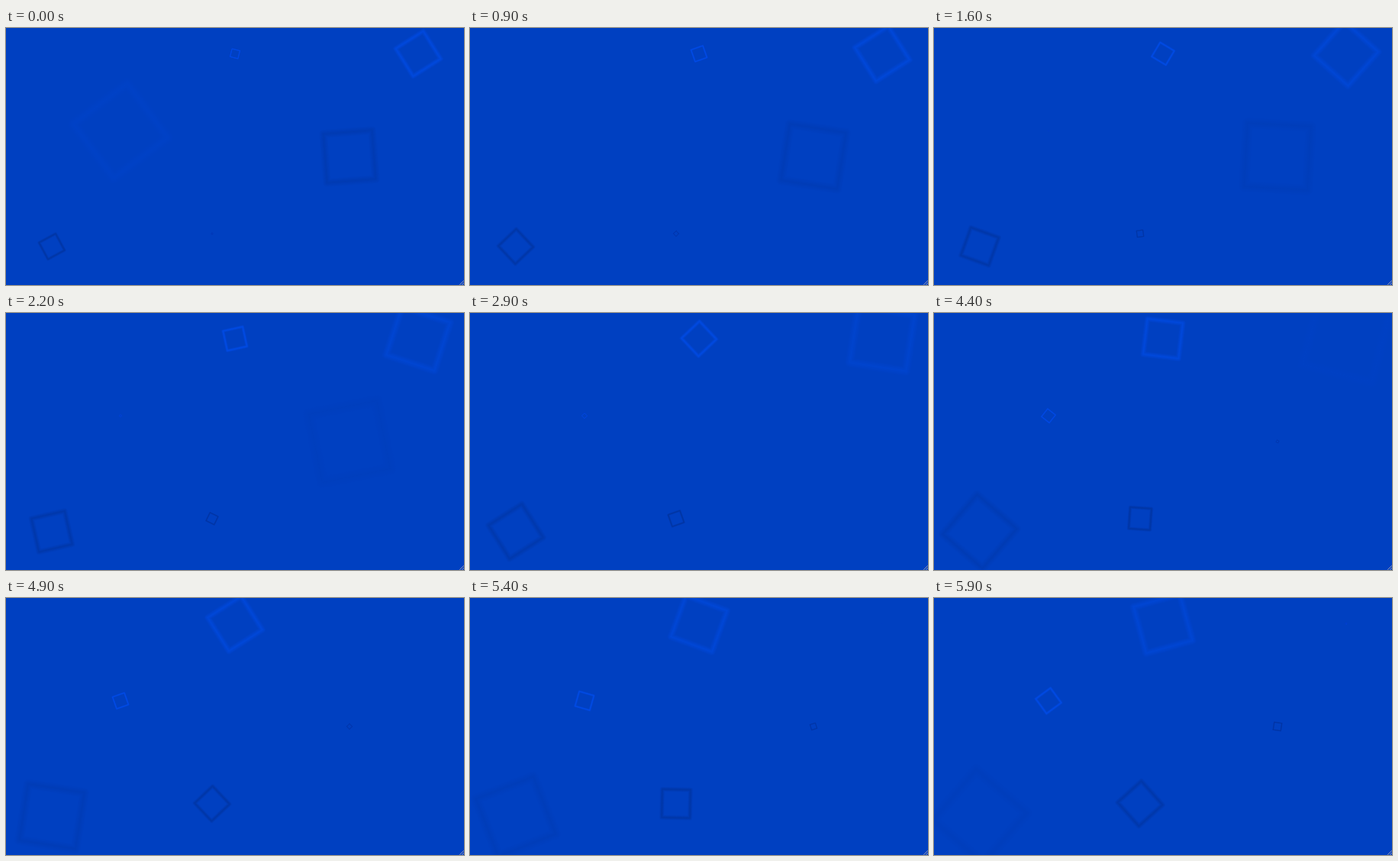
An HTML page that plays this animation: 600 by 336 pixels, repeating every 6000 ms.

```html
<!DOCTYPE html>
<html lang="en">
<head>
<meta charset="utf-8">
<title>Floating squares</title>
<style>
html, body { margin: 0; width: 100%; height: 100%; overflow: hidden; background: #0040c1; }
svg { display: block; width: 600px; height: 336px; }
</style>
</head>
<body>
<svg id="stage" viewBox="0 0 600 336">
  <rect width="600" height="336" fill="#0040c1"/>
  <g id="cubes" fill="none" stroke-linejoin="round"></g>
  <path d="M594.2 335.8L599.8 330.2M597.2 335.8L599.8 333.2" stroke="#8f9bb5" stroke-width="1"/>
</svg>
<script>
const NS = 'http://www.w3.org/2000/svg';
const LOOP = 6000, STEP = 100;
const LIFE = 12, GAP = 2, FIRST_AGE = 1.26;
const UNIT = 107 / 12;   // final length of one border width
const TURN = 960;
const LAYERS = 5;        // stacked strokes give the border its soft edge
const DARK = '#003298', LIGHT = '#0051f4';
const centers = [[270, 268.8], [150, 134.4], [450, 168], [540, 33.6], [60, 285.6], [300, 33.6]];

function add(parent, tag, attrs) {
  const el = document.createElementNS(NS, tag);
  for (const key in attrs) el.setAttribute(key, attrs[key]);
  return parent.appendChild(el);
}

const root = document.getElementById('cubes');
const cubes = centers.map(([x, y], i) => {
  const el = add(root, 'g', { stroke: i % 2 ? LIGHT : DARK });
  for (let k = 0; k < LAYERS; k++) {
    add(el, 'rect', {
      x: -5.5, y: -5.5, width: 11, height: 11,
      'stroke-width': 2 * (LAYERS - k - 0.5) / LAYERS,
      'stroke-opacity': 1 / (LAYERS - k)
    });
  }
  return { el, x, y, age: FIRST_AGE - GAP * i };
});

// cubic-bezier(.42, 0, 1, 1)
function easeIn(x) {
  let lo = 0, hi = 1;
  for (let i = 0; i < 30; i++) {
    const s = (lo + hi) / 2;
    if (1.26 * s + 0.48 * s * s - 0.74 * s * s * s < x) lo = s; else hi = s;
  }
  return lo * lo * (3 - 2 * lo);
}

function draw(ms) {
  const t = Math.floor((ms % LOOP) / STEP) * STEP / 1000;
  for (const c of cubes) {
    const age = (c.age + t + LIFE) % LIFE;
    const e = easeIn(age / LIFE);
    c.el.setAttribute('transform',
      `translate(${c.x} ${c.y}) scale(${UNIT * e}) rotate(${TURN * e})`);
    c.el.setAttribute('opacity', 1 - e);
  }
}

const start = performance.now();
function tick() {
  draw(performance.now() - start);
  requestAnimationFrame(tick);
}
tick();
</script>
</body>
</html>
```
